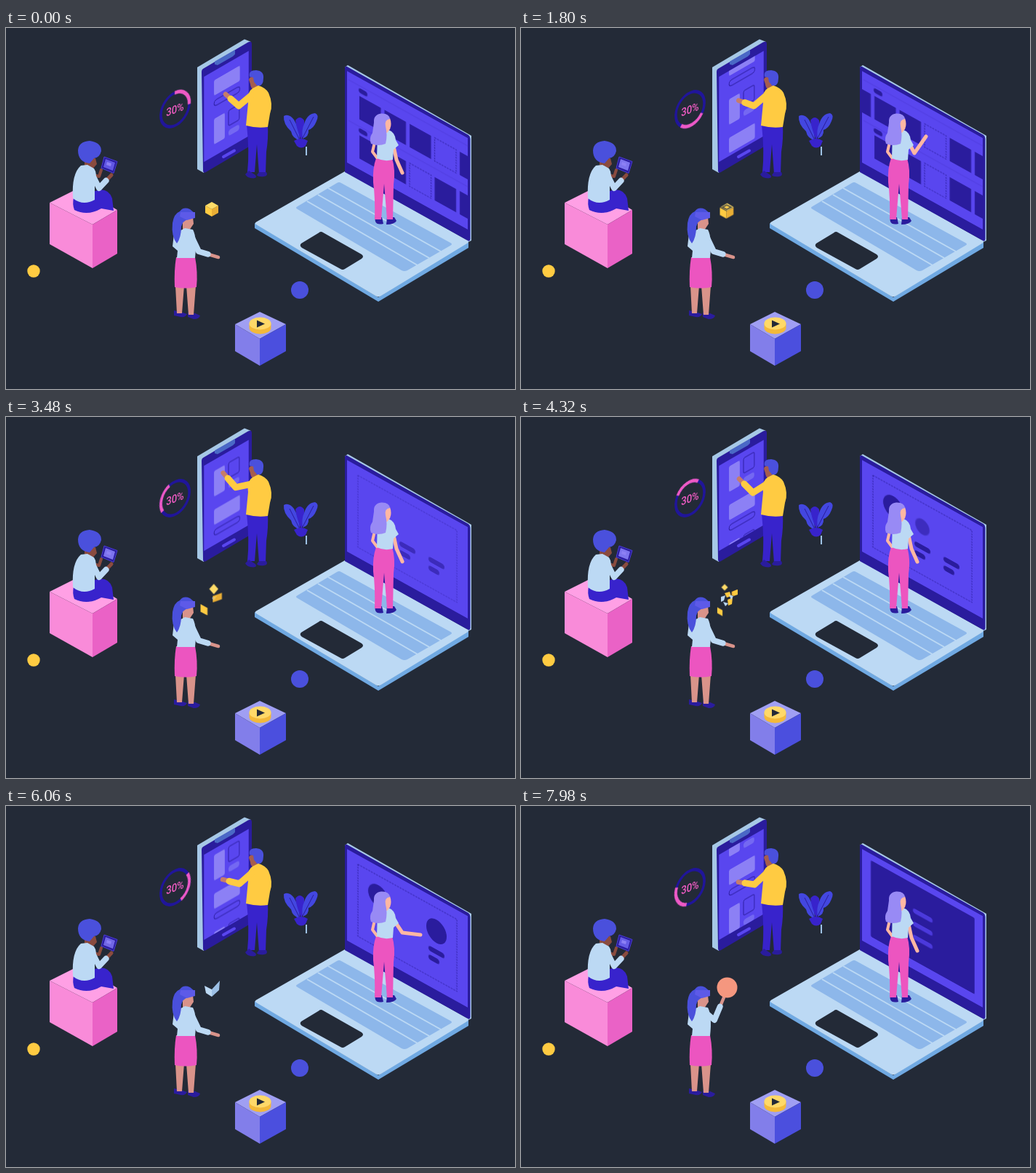
Animation of 700 by 496 pixels, one loop 8 s. Source, as an HTML page without scripts:

```html
<!DOCTYPE html>
<html lang="en">
<head>
<meta charset="utf-8">
<title>Isometric devices</title>
<style>
html, body { margin: 0; width: 100%; height: 100%; overflow: hidden; background: #232a37; }
svg { display: block; width: 700px; height: 496px; }
:root { --navy: #2a1c9d; --violet: #5946ef; --blue: #4a50dc; --sky: #bcd9f4; --pink: #ec55c0; --gold: #ffcb42; }
.navy { fill: var(--navy); } .violet { fill: var(--violet); } .blue { fill: var(--blue); }
.sky { fill: var(--sky); } .pink { fill: var(--pink); } .gold { fill: var(--gold); }
.denim { fill: #3823cc; } .lilac { fill: #8c80f5; } .brown { fill: #8a4b3f; } .tan { fill: #d9938a; } .peach { fill: #ffb7a3; }
.dash { fill: none; stroke: var(--navy); stroke-width: 1; stroke-dasharray: 2 1.6; }
.line { fill: none; stroke: var(--navy); stroke-width: 1; }
.limb { fill: none; stroke-linecap: round; stroke-linejoin: round; }
.anim, .anim * { animation: 8s linear infinite; }
.pop, .piece { transform-box: fill-box; transform-origin: center; }

#arc { animation-name: spin; }
@keyframes spin { from { transform: rotate(43deg); } to { transform: rotate(600deg); } }

/* phone: swipe and scroll */
#feed { animation-name: feed; animation-timing-function: ease-in-out; }
@keyframes feed {
  0% { transform: translateY(13px); }
  10%, 34% { transform: translateY(-14px); }
  48%, 75% { transform: translateY(-44px); }
  85% { transform: translateY(-79px); }
  100% { transform: translateY(-77px); }
}
.manArm { animation-name: manArm !important; }
@keyframes manArm {
  0% { d: path("M338 92L320 107L302 91"); }
  10.5% { d: path("M338 92L313 89L297 64"); }
  12.75% { d: path("M338 92L317 95L299 72"); }
  16.5% { d: path("M338 92L319 104L300 85"); }
  24.7% { d: path("M338 92L321 108L299 105"); }
  32.25% { d: path("M338 92L327 114L305 125"); }
  37.5% { d: path("M338 92L320 107L301 94"); }
  48% { d: path("M338 92L313 89L297 64"); }
  54% { d: path("M338 92L319 104L300 85"); }
  62.25% { d: path("M338 92L321 108L299 105"); }
  69.75% { d: path("M338 92L327 114L305 125"); }
  75.75% { d: path("M338 92L321 107L298 101"); }
  85.5% { d: path("M338 92L313 89L297 64"); }
  91.5% { d: path("M338 92L319 104L299 86"); }
  100% { d: path("M338 92L321 108L299 105"); }
}

/* laptop */
#row { animation-name: row; animation-timing-function: ease-in-out; }
@keyframes row { 0%, 11% { transform: none; } 17%, 100% { transform: translateX(-34.5px); } }
#cards { animation-name: cards; }
@keyframes cards { 0%, 37% { opacity: 1; } 42%, 100% { opacity: 0; } }
#profile { animation-name: profile; }
@keyframes profile { 0%, 41% { opacity: 0; } 45%, 84% { opacity: 1; } 88%, 100% { opacity: 0; } }
.c1 { animation-name: c1 !important; }
@keyframes c1 { 0%, 44% { transform: scale(0); } 49%, 100% { transform: none; } }
.c2 { animation-name: c2 !important; }
@keyframes c2 {
  0%, 51% { transform: scale(0); opacity: .3; } 54% { transform: scale(.7); opacity: .6; }
  57%, 70% { transform: none; opacity: 1; } 74%, 100% { transform: scale(0); opacity: 0; }
}
.b2 { animation-name: b2 !important; }
@keyframes b2 { 0%, 70% { opacity: 1; } 74%, 100% { opacity: 0; } }
#blob { animation-name: blob; animation-timing-function: ease-out; }
@keyframes blob {
  0%, 54.5% { x: 121px; y: 45px; width: 0; height: 0; rx: 14px; ry: 16px; }
  60%, 79% { x: 107px; y: 29px; width: 28px; height: 32px; rx: 14px; ry: 16px; }
  85.5% { x: 11.5px; y: 10px; width: 141px; height: 103px; rx: 19px; ry: 21px; }
  89%, 100% { x: 10px; y: 9px; width: 143px; height: 105px; rx: 2px; ry: 2px; }
}
.menu { animation-name: menu !important; }
@keyframes menu {
  0%, 84% { width: 0; opacity: 0; } 85.5% { width: 6px; opacity: 1; } 91%, 100% { width: 27px; opacity: 1; }
}
.late { animation-name: late !important; }
@keyframes late { 0%, 88% { width: 0; opacity: 0; } 89% { width: 6px; opacity: 1; } 95%, 100% { width: 27px; opacity: 1; } }
.ladyArm { animation-name: ladyArm !important; animation-timing-function: ease-in-out !important; }
@keyframes ladyArm {
  0%, 3% { d: path("M531 153L537 181L545 199"); }
  10%, 36% { d: path("M531 153L541 172L557 149"); }
  44%, 69% { d: path("M531 153L537 181L545 199"); }
  75%, 77% { d: path("M531 153L545 174L570 177"); }
  83.5%, 100% { d: path("M531 153L537 181L545 199"); }
}

/* headset user */
.vrArm { animation-name: vrArm !important; animation-timing-function: ease-in-out !important; }
@keyframes vrArm {
  0%, 88% { d: path("M254 284L265 307L292 315"); }
  96%, 100% { d: path("M254 284L266 294L279 263"); }
}

/* floating object */
#box { animation-name: box; }
@keyframes box { 0% { transform: none; } 12%, 20% { transform: translateY(3px); } 30%, 100% { transform: none; } }
#hole { animation-name: hole; }
@keyframes hole { 0%, 8% { opacity: 0; } 12%, 22% { opacity: 1; } 24%, 100% { opacity: 0; } }
.pL { animation-name: pL !important; }
@keyframes pL {
  0%, 22% { transform: none; } 32% { transform: translate(-7.5px, 10.5px) scale(1.35, 1.3); }
  54% { transform: translate(-5px, 16px) scale(.8); } 68%, 100% { transform: translate(5px, 1px) scale(0); }
}
.pR { animation-name: pR !important; }
@keyframes pR {
  0%, 22% { transform: none; } 32% { transform: translate(0, 4px) scale(2, 1.2); }
  54% { transform: translate(6px, -10px) scale(.85, .6); } 68%, 100% { transform: translate(-4px, 0) scale(0); }
}
.pT { animation-name: pT !important; }
@keyframes pT {
  0%, 22% { transform: none; } 32% { transform: translate(9px, -5px) scale(.9, 2); }
  54% { transform: translate(-3px, -10px) scale(.5, .9); } 68%, 100% { transform: translate(0, 6px) scale(0); }
}
#bits { animation-name: bits; }
@keyframes bits {
  0%, 40% { transform: scale(0); opacity: 1; } 54% { transform: none; opacity: 1; }
  68%, 100% { transform: scale(.3); opacity: 0; }
}
#wings { animation-name: wings; }
@keyframes wings {
  0%, 62% { transform: scale(0); } 73%, 78% { transform: none; opacity: 1; } 82%, 100% { transform: scale(1.2); opacity: 0; }
}
#token { animation-name: token; }
@keyframes token {
  0%, 77% { transform: scale(0); fill: #bcd9f4; } 84%, 88% { transform: none; fill: #ea8fd2; }
  96%, 100% { transform: none; fill: #f5977f; }
}

/* seated reader */
.swipe { animation-name: swipe !important; animation-timing-function: ease-in-out !important; }
@keyframes swipe {
  0%, 7% { d: path("M119 202L128 220L145 202"); }
  11%, 14% { d: path("M119 202L131 216L144 190"); }
  20%, 100% { d: path("M119 202L128 220L145 202"); }
}
#shot { animation-name: shot; }
@keyframes shot { 0%, 12% { fill: #6157e4; } 18%, 74% { fill: #7d74ee; } 84%, 88% { fill: #3a2cba; } 96%, 100% { fill: #665ce6; } }
</style>
</head>
<body>
<svg viewBox="0 0 700 496" class="anim">
  <defs>
    <clipPath id="phoneClip"><path d="M0 0H69V117H0Z"/></clipPath>
    <clipPath id="lapClip"><path d="M-2 0H164V126H-2Z"/></clipPath>
    <rect id="card" width="29.5" height="32" class="navy"/>
    <rect id="slot" width="29.5" height="32" class="dash"/>
    <g id="block">
      <rect x="14" width="41" height="21" rx="2" class="lilac"/>
      <rect x="14" y="28" width="41" height="8" rx="4" class="line"/>
      <rect x="14" y="53" width="17" height="35" rx="2" class="lilac"/>
      <rect x="37" y="53" width="17" height="21" rx="2" class="line"/>
      <rect x="37" y="80" width="17" height="8" rx="3.5" fill="#7468f2"/>
    </g>
  </defs>

  <circle cx="38" cy="334" r="8.7" class="gold"/>
  <circle cx="404" cy="360" r="12" class="blue"/>

  <!-- progress ring -->
  <g transform="matrix(.85 -.32 -.05 1 232.5 111.5)">
    <circle r="23" fill="none" stroke="#20159a" stroke-width="4.2"/>
    <path id="arc" d="M-17 -15.500A23 23 0 0 1 17 -15.500" fill="none" stroke="#ef5ac5" stroke-width="4.800"/>
    <text y="5.700" text-anchor="middle" font-family="Roboto, sans-serif" font-size="15.500" font-weight="500" fill="#f05cc4">30%</text>
  </g>

  <!-- phone -->
  <path d="M263 54L328 15.500L337 19L272 199L263 194Z" fill="#a6c8e6"/>
  <path d="M269 60Q269 57 271 56L333 19.500Q338 17 338 22V159Q338 161 336 162L275 198Q271 200 271 196Z" class="navy"/>
  <g transform="matrix(.866 -.5 0 1 274 66)">
    <rect x="-2" width="71" height="117" class="violet"/>
    <g clip-path="url(#phoneClip)">
      <g id="feed"><use href="#block"/><use href="#block" y="106"/></g>
    </g>
  </g>
  <path d="M287 46L315 30V36L312 39L291 51L287 50Z" fill="#4a68c6"/>
  <path d="M299 177L314 168.500" class="limb" stroke="#5946ef" stroke-width="4"/>

  <!-- man -->
  <path d="M331 133H360Q361 152 358 170L357 200H348L345 160L342 198H332Q335 170 331 133Z" class="denim"/>
  <path d="M334 196L343 202Q346 206 340 206.500Q331 206 329 201ZM348 198H358Q361 203 355 204Q347 205 345 202Z" class="navy"/>
  <path d="M334 71Q335 66 343 67L348 82L341 85Q336 82 336 77Z" fill="#a55d4f"/>
  <path d="M335 67Q333 58 344 58Q355 59 354 69Q354 80 346 80L341 74L340 68Z" class="blue"/>
  <path d="M339 83L347 79Q357 82 361 89Q368 105 363 118L360 136Q345 138 330 134L333 103Q331 88 339 83Z" class="gold"/>
  <path class="limb manArm" d="M338 92L320 107L302 91" stroke="#c67c6a" stroke-width="6.500"/>
  <path class="limb manArm" d="M338 92L320 107L302 91" pathLength="100" stroke="#ffcb42" stroke-width="9" stroke-dasharray="80 200"/>

  <!-- plant -->
  <path d="M404 154Q394 152 392 142Q381 132 382 121Q389 117 396 126Q404 139 404 154Z" fill="#4347e0"/>
  <path d="M406 154Q400 140 398 127Q404 119 410 127L411 142Z" class="denim"/>
  <path d="M408 152Q406 140 410 132Q414 118 425 117Q431 119 427 128Q423 138 416 140Q417 149 408 152Z" fill="#4347e0"/>
  <path d="M404 154L390 126M408 151L423 122" class="line"/>
  <path d="M396 155Q406 149 415 155L412 162Q406 167 400 162Z" class="denim"/>
  <path d="M413 163V175" stroke="#9fc3e6" stroke-width="2"/>

  <!-- laptop -->
  <path d="M342 268V275L512 376L636 302V293L512 370Z" fill="#70a9e2"/>
  <path d="M345 266L466 197L635 292Q637 294 634 296L515 368.500Q512 370 509 368.500L344 270Q341 268 345 266Z" class="sky"/>
  <path d="M455 213Q458 211 461 213L611 295Q615 297 611 299L552 333Q548 335 544 333L401 249Q397 247 401 245Z" fill="#8db7ea"/>
  <path d="M443 220L598 307M429 229L582 316M414 238L566 326" stroke="#bcd9f4" stroke-width="2"/>
  <path d="M430 281.500Q433 279 436 281L489 311Q493 314 489 317L466 331Q463 333 460 331L407 302Q403 299 406 296Z" fill="#232a37"/>
  <path d="M466 54L470 51L640 148V292L636 294Z" fill="#a8c9e8"/>
  <path d="M466 55Q466 52 469 53L636 147Q638.500 149 638.500 152V290Q638 294 635 292L466 198Z" class="navy"/>
  <g transform="matrix(1 .555 0 1 471 60)" clip-path="url(#lapClip)">
    <rect x="-2" width="166" height="126" class="violet"/>
    <g id="cards">
      <path d="M0 11H164M0 67H164" stroke="#4c39d8" stroke-width=".7"/>
      <rect x="14" y="14" width="12" height="6.500" rx="3" class="navy"/>
      <rect x="14" y="69" width="12" height="6.500" rx="3" class="navy"/>
      <g id="row">
        <use href="#card" x="15" y="25"/><use href="#card" x="49.5" y="25"/><use href="#card" x="84" y="25"/>
        <use href="#slot" x="118.500" y="25"/><use href="#card" x="153" y="25"/><use href="#card" x="187.500" y="25"/>
      </g>
      <use href="#card" x="15" y="79"/><use href="#card" x="49.5" y="79"/><use href="#slot" x="84" y="79"/>
      <use href="#card" x="118.500" y="79"/><use href="#card" x="153" y="79"/>
    </g>
    <g id="profile">
      <rect x="13" y="13" width="136" height="99" class="dash"/>
      <ellipse cx="41" cy="41" rx="14" ry="15" class="navy pop c1"/>
      <ellipse cx="81" cy="46" rx="14" ry="15" class="navy pop c2"/>
      <g class="navy">
        <g class="b2"><rect x="70" y="71" width="22" height="7" rx="3.5"/><rect x="70" y="83" width="15" height="7" rx="3.5"/></g>
        <rect x="110" y="70" width="22" height="7" rx="3.5"/><rect x="110" y="82" width="15" height="7" rx="3.5"/>
      </g>
    </g>
    <rect id="blob" class="navy"/>
    <g fill="#4b39dc">
      <rect class="menu" x="68" y="42" height="6.500" rx="3.2"/>
      <rect class="late" x="68" y="60" height="6.500" rx="3.2"/>
      <rect class="late" x="68" y="78" height="6.500" rx="3.2"/>
    </g>
  </g>

  <!-- woman at laptop -->
  <path d="M507 260H517L519 269Q510 271 508 266ZM524 260H534L537 265Q534 270 523 270Z" class="navy"/>
  <path d="M509 179H531Q536 195 533 215L532 263H524L520 214L516 263H507Q508 235 505 212Q504 192 509 179Z" class="pink"/>
  <path d="M507 157L504 170L510 178" class="limb" stroke="#ffb7a3" stroke-width="4"/>
  <path class="limb ladyArm" d="M531 153L537 181L545 199" stroke="#ffb7a3" stroke-width="5"/>
  <path d="M511 143L526 140Q535 143 536 154L540 161L533 167L532 181Q520 184 510 179Z" class="sky"/>
  <path d="M517 126L528 124Q531 132 528 139L524 144L517 143Z" class="peach"/>
  <path d="M506 130Q505 119 516 117.500Q527 117 528 125Q520 126 522 135Q525 147 522 159Q512 163 502 159Q499 151 504 144Z" fill="#988af5"/>

  <!-- seated reader -->
  <path d="M60 240L92 224H110L153 250L119 270Z" fill="#ffa0e5"/>
  <path d="M60 240L119 270V330L60 297Z" fill="#f98bd9"/>
  <path d="M119 270L153 250V310L119 330Z" fill="#ea62c6"/>
  <path d="M93 233L122 224Q140 218 146 234L148 251L131 248Q112 259 94 250Q91 242 93 233Z" class="denim"/>
  <path d="M120 202L128 204L131 195" class="limb" stroke="#8a4b3f" stroke-width="4"/>
  <path d="M108 179H123L125 187L118 195L108 193Z" class="brown"/>
  <path d="M99 168Q100 156 115 155Q131 157 131 169Q129 178 121 179L115 186Q99 184 99 168Z" class="blue"/>
  <path d="M103 189L112 188L121 193Q126 200 122 210V236Q106 245 92 234Q90 200 103 189Z" class="sky"/>
  <path d="M135 177L153 183.500L148 199.500L131 192.500Z" class="navy" stroke="#4a3cd4"/>
  <path id="shot" d="M137 180L150 185L147 196L134 191Z"/>
  <path d="M139 184L145 186L144 190L138 188Z" class="lilac"/>
  <path class="limb swipe" d="M119 202L128 220L145 202" stroke="#8a4b3f" stroke-width="5"/>
  <path class="limb swipe" d="M119 202L128 220L145 202" pathLength="100" stroke="#bcd9f4" stroke-width="8" stroke-dasharray="76 200"/>

  <!-- woman with headset -->
  <path d="M231 388L243 391L249 393Q247 398 240 397L231 395ZM250 391L260 392L267 395Q266 400 258 400L250 397Z" class="navy"/>
  <path d="M233 354H245L242 392H235ZM248 354H261L258 394H251Z" class="tan"/>
  <path d="M234 315H260Q264 335 262 356Q247 359 232 356Q231 333 234 315Z" class="pink"/>
  <path d="M243 262L257 260L258 269L252 278L243 277Z" class="tan"/>
  <path d="M231 283L246 275L257 277Q263 288 260 316H235L236 306L229 300Z" class="sky"/>
  <path d="M239 252Q244 245 253 249L259 254L250 263Q243 265 241 273Q241 288 235 296Q227 286 229 268Q231 255 239 252Z" class="blue"/>
  <path d="M240 253L260 253V261L249 264L239 259Z" fill="#5d5ae8"/>
  <path class="limb vrArm" d="M254 284L265 307L292 315" stroke="#d9938a" stroke-width="4.500"/>
  <path class="limb vrArm" d="M254 284L265 307L292 315" pathLength="100" stroke="#bcd9f4" stroke-width="8" stroke-dasharray="72 200"/>

  <!-- floating object -->
  <g id="box">
    <path class="piece pR" d="M283 249L292 244V254L283 259Z" fill="#e9ae35"/>
    <path class="piece pL gold" d="M274 244L283 249V259L274 254Z"/>
    <path class="piece pT" d="M283 239L292 244L283 249L274 244Z" fill="#ffdc68"/>
    <g id="hole"><path d="M283 240L291 244L283 248L275 244Z" fill="#232a37"/><path d="M283 242L287 244L283 246L279 244Z" class="gold"/></g>
  </g>
  <g id="bits" class="piece">
    <path d="M280 242L287 240L289 246L283 248ZM284 251L291 248L290 257L285 259ZM291 240L298 237V244L292 246Z" class="gold"/>
    <path d="M275 247L281 245L279 252L275 254ZM286 244L292 246L289 251ZM278 254L285 256L281 260Z" class="sky"/>
  </g>
  <g id="wings" class="piece">
    <path d="M273 247L283 252V262L275 257Z" class="sky"/>
    <path d="M283 252L294 240L293 253L283 262Z" fill="#9dc0e6"/>
  </g>
  <circle id="token" class="piece" cx="283.500" cy="249.500" r="14"/>

  <!-- play cube -->
  <path d="M315 407L349 390L385 407L349 427Z" fill="#a09ff3"/>
  <path d="M315 407L349 427V464L315 444Z" fill="#827eea"/>
  <path d="M349 427L385 407V444L349 464Z" fill="#4b4fde"/>
  <path d="M334.500 406V412A15 8.500 0 0 0 364.500 412V406Z" fill="#f3b93a"/>
  <ellipse cx="349.500" cy="406" rx="15" ry="8.500" fill="#ffd968"/>
  <path d="M345 401.500L356 406.500L345 411.500Z" fill="#232a37"/>
</svg>
</body>
</html>
```
